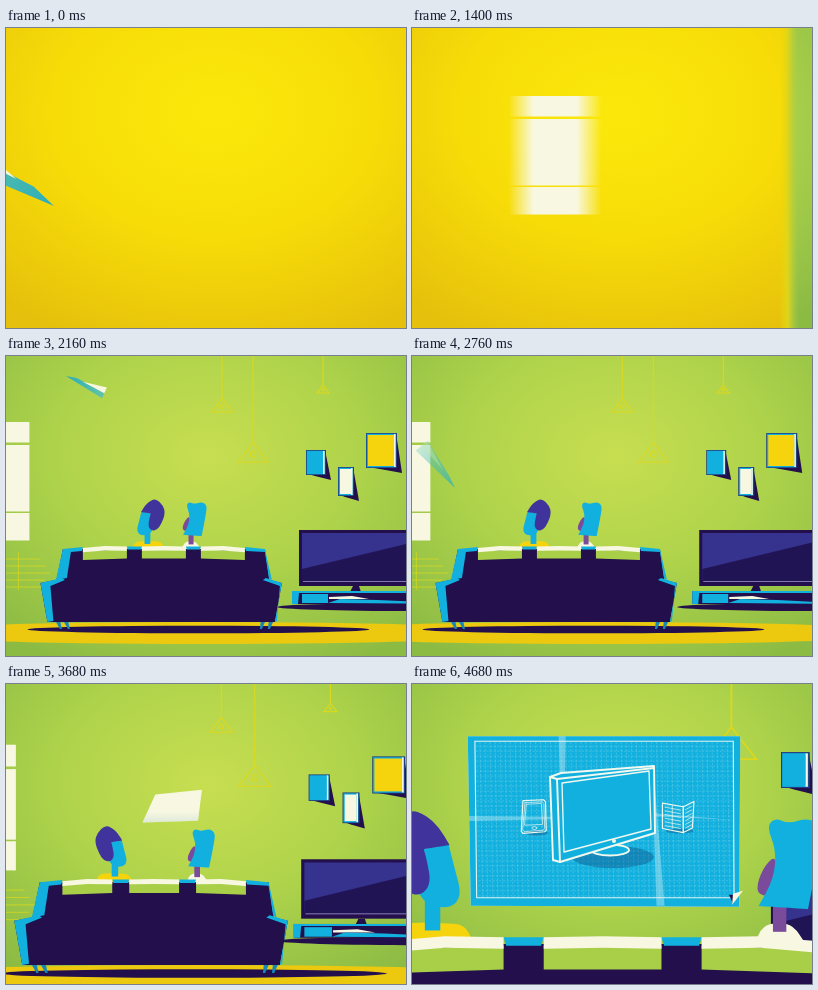
An HTML page with a canvas for the animation above (4760 ms loop, 400 by 300 pixels).

```html
<!DOCTYPE html>
<html lang="en">
<head>
<meta charset="utf-8">
<title>Paper plane</title>
<style>
html, body { margin: 0; width: 100%; height: 100%; overflow: hidden; background: #f6da08; }
canvas { display: block; width: 400px; height: 300px; }
</style>
</head>
<body>
<canvas id="stage" width="400" height="300"></canvas>
<script>
const g = document.getElementById('stage').getContext('2d');
const LOOP = 4760, STEP = 40;
const INK = '#230f4b', BLUE = '#12b0df', CREAM = '#f8f8e2', YELLOW = '#f5d30d',
  VIOLET = '#40349c', PLUM = '#7a4b9b', WIRE = '#ded81a';

// Motion rules
const mix = (a, b, u) => a + (b - a) * u;
const ramp = (t, a, b) => {
  const u = Math.min(1, Math.max(0, (t - a) / (b - a)));
  return u * u * (3 - 2 * u);
};
// Distance still to travel for a part that glides to rest.
const glideIn = (t, x, tau) => x * Math.exp((1400 - t) / tau);
const roomX = t => glideIn(t, 373, 184);
const windowX = t => glideIn(t, 159, 220);
const dolly = t => ramp(t, 3490, 4170) + 0.02 * ramp(t, 4100, 4800);
const bezier = (a, b, c, d, u) => {
  const v = 1 - u;
  return v * v * v * a + 3 * v * v * u * b + 3 * v * u * u * c + u * u * u * d;
};

// Drawing helpers
function trace(p) {
  g.beginPath();
  for (let i = 0; i < p.length; i += 2) g.lineTo(p[i], p[i + 1]);
}
function poly(color, ...p) {
  trace(p);
  g.closePath();
  g.fillStyle = color;
  g.fill();
}
function line(...p) { trace(p); g.stroke(); }
function loop(...p) { trace(p); g.closePath(); g.stroke(); }
function rect(color, x, y, w, h) { g.fillStyle = color; g.fillRect(x, y, w, h); }
function ring(x, y, rx, ry = rx) {
  g.beginPath();
  g.ellipse(x, y, rx, ry, 0, 0, 7);
  g.stroke();
}
function oval(color, x, y, rx, ry) {
  g.beginPath();
  g.ellipse(x, y, rx, ry, 0, 0, 7);
  g.fillStyle = color;
  g.fill();
}
// Smooth closed shape; a point given twice makes a sharp corner.
function blob(color, ...p) {
  const n = p.length, mid = i => [(p[i % n] + p[(i + 2) % n]) / 2, (p[(i + 1) % n] + p[(i + 3) % n]) / 2];
  g.beginPath();
  g.moveTo(...mid(n - 2));
  for (let i = 0; i < n; i += 2) g.quadraticCurveTo(p[i], p[i + 1], ...mid(i));
  g.fillStyle = color;
  g.fill();
}
function at(x, y, sx, sy, draw) {
  g.save();
  g.translate(x, y);
  g.scale(sx, sy);
  draw();
  g.restore();
}
function glow(x, y, r, stops) {
  const f = g.createRadialGradient(x, y, 0, x, y, r);
  stops.forEach((c, i) => f.addColorStop(i / (stops.length - 1), c));
  return f;
}
function fade(x0, x1, ...stops) {
  const f = g.createLinearGradient(x0, 0, x1, 0);
  stops.forEach(([u, c]) => f.addColorStop(u, c));
  return f;
}
const sunny = glow(160, 85, 250, ['#fbe90a', '#f7dc08', '#e5c00c']);
const leafy = glow(155, 100, 235, ['#c8de51', '#aed34b', '#8cbb44']);
const backdrop = fill => at(0, 0, 1.3, 1, () => rect(fill, 0, 0, 400, 300));

// One camera for all layers: nearer layers have more depth and grow faster.
function layer(t, depth, x, draw) {
  const z = 1 / (1 - depth * dolly(t));
  at(119 * (1 - z) + x - 2 * ramp(t, 2800, 3600), 153 * (1 - z), z, z, draw);
}

// Room
function panes(t) {
  const x = windowX(t) - 50, w = 68;
  const b = Math.min(30, (windowX(t - STEP) - windowX(t)) * 0.8), e = b / (w + b);
  const clear = 'rgba(248,248,226,0)';
  const fill = b < 2 ? CREAM : fade(x - b / 2, x + w + b / 2, [0, clear], [e, CREAM], [1 - e, CREAM], [1, clear]);
  const y = 2 * (1 - ramp(t, 1400, 1800));
  for (const [top, h] of [[66, 20.5], [89, 66.5], [157, 27.5]]) rect(fill, x - b / 2, top + y, w + b, h);
}
function picture(x, y, w, h, color) {
  poly(INK, x + 2, y + h - 1, x + w - 1, y, x + w + 5, y + h + 5, x + w * 0.45, y + h + 1);
  rect('#1f3f80', x, y, w, h);
  rect(BLUE, x + 0.8, y + 0.8, w - 2, h - 1.6);
  rect(CREAM, x + w - 3, y + 1, 1.6, h - 2);
  rect(color, x + 2, y + 2, w - 5, h - 4);
}
function shelf() {
  g.strokeStyle = WIRE;
  g.lineWidth = 0.7;
  for (let i = 0; i < 5; i++) line(-60, 203 + i * 7, 26 + (i * 5) % 11, 203 + i * 7);
  line(4, 196, 4, 234);
}
function wall() {
  picture(294, 94, 20, 25, BLUE);
  picture(326, 111, 16, 29, CREAM);
  picture(354, 77, 31, 35, YELLOW);
  oval(INK, 400, 251, 135, 4);
  rect(INK, 287, 174, 150, 56);
  rect('#36338f', 290, 177, 145, 47);
  poly('#211455', 290, 213, 435, 178, 435, 225, 290, 225);
  rect('#8b83bd', 291, 225, 144, 0.9);
  poly(INK, 341, 230, 347, 230, 349, 236, 338, 236);
  rect(INK, 280, 235, 170, 13);
  poly(BLUE, 280, 235, 450, 235, 450, 237, 287, 237, 286, 248, 280, 248);
  rect(BLUE, 290, 238, 26, 9);
  poly(CREAM, 317, 241, 340, 240, 357, 243, 317, 243);
  poly(BLUE, 328, 243, 365, 244, 450, 248, 316, 247);
}
function lamp(x, y, w) {
  const h = w * 1.28;
  line(x, -80, x, y - h);
  loop(x, y - h, x + w, y, x - w, y);
  ring(x, y - h * 0.4, w * 0.18);
}
function lamps() {
  g.strokeStyle = WIRE;
  g.lineWidth = 1.05;
  lamp(210, 56, 10.5);
  lamp(241, 106, 15);
  lamp(311, 37, 6);
}
function room(t) {
  const x = roomX(t), edge = glideIn(t, 376, 85);
  if (edge < 400) {
    g.save();
    g.beginPath();
    g.rect(edge, 0, 400, 300);
    g.clip();
    backdrop(leafy);
    g.restore();
  }
  if (edge > 4 && edge < 420) {
    rect(fade(edge - 9, edge + 11, [0, 'rgba(240,214,10,0)'], [0.45, '#dcd51c'], [1, 'rgba(170,205,70,0)']), edge - 9, 0, 20, 300);
  }
  layer(t, 0.39, x, lamps);
  layer(t, 0.3, x * 1.4, shelf);
  layer(t, 0.3, x, wall);
  layer(t, 0.3, 0, () => panes(t));
}

// Sofa and the two viewers
function sofa() {
  for (const s of [-1, 1]) {
    for (const x of [s * 99, s * 107]) poly('#1787b8', x - 2, 73, x + 3, 73, x + 2 - s * 3, 82, x - s * 3, 82);
  }
  poly(INK, -101, 2, 101, 2, 106, 36, 106, 75, -106, 75, -108, 36);
  for (const s of [-1, 1]) {
    const out = s < 0 ? 123.5 : 118, lit = s < 0 ? 10 : 2;
    poly(INK, s * 98, 31, s * out, 36, s * (out - 7), 75, s * 98, 75);
    poly(BLUE, s * 101, 2, s * 81, 0, s * 82, 4, s * (103 - lit), 5, s * (107 - lit), 31, s * 108, 33);
    poly(BLUE, s * out, 36, s * 102, 31, s * 99, 33, s * (out - lit), 39, s * (out - lit - 3), 74, s * (out - 7), 75);
    poly(BLUE, s * 37, -0.5, s * 22, -0.5, s * 23, 2.6, s * 36, 2.6);
  }
  for (const c of [-59, 0, 59]) {
    const a = c - 22, b = c + 22, l = c < 0 ? 1 : -0.5, r = c > 0 ? 1 : -0.5, m = -0.9;
    poly('#a9cf49', a, l + 3, b, r + 3, b, r + 12, a, l + 12);
    poly(CREAM, a, l, c, m, b, r, b, r + 4.3, c, m + 4.3, a, l + 4.3);
  }
}
function man() {
  blob(YELLOW, -40, 4, -40, 4, -34, -14, -8, -16, 12, -15, 34, -14, 42, 4, 42, 4);
  rect(BLUE, -5, -45, 15, 37);
  blob(BLUE, -7, -87, -7, -87, 18, -92, 18, -92, 24, -68, 31, -42, 20, -29, -4, -33, -14, -50);
  blob(VIOLET, -38, -108, -20, -126, -4, -120, 9, -108, 19, -91, 19, -91, -6, -87, -6, -87,
    -3, -76, 1, -54, -8, -42, -22, -44, -34, -60, -44, -88);
}
function woman() {
  blob(CREAM, -28, 4, -28, 4, -20, -14, -4, -17, 10, -14, 22, 4, 22, 4);
  rect(PLUM, -10, -40, 13, 32);
  blob(PLUM, -6, -84, -20, -70, -27, -48, -18, -42, -4, -46);
  blob(BLUE, -16, -110, -8, -119, 5, -113, 24, -119, 38, -110, 35, -85, 24, -30, 24, -30,
    -24, -33, -24, -33, -9, -60, -7, -88);
}
function viewers(t) {
  const apart = ramp(t, 3420, 4170), face = t < 3200 ? -1 : 1, s = 1 / 2.6;
  layer(t, 0.615, roomX(t) * 1.9, () => {
    oval('#ecc90f', 186, 277, 315, 11);
    oval(INK, 181, 273.5, 171, 3.8);
    at(131 - 9 * ramp(t, 2160, 2700) - 40 * apart, 191, s * face, s, man);
    at(175 + 39 * apart, 191.5, s, s, woman);
    at(146.5, 191, 1, 1, sofa);
  });
}

// Plane: nose follows a Bezier curve, size runs from s0 to s1
const swoop = { t0: 0, t1: 1120, s0: 110, s1: 50, x: [48, 480, 430, -90], y: [178, 430, -340, 210] };
const glides = [
  { t0: 1640, t1: 2160, s0: 52, s1: 42, x: [450, 330, 160, 60], y: [110, 80, 65, 20] },
  { t0: 2160, t1: 2760, s0: 42, s1: 54, x: [60, -60, -20, 43], y: [20, -34, 54, 132] },
  { t0: 2760, t1: 3400, s0: 54, s1: 30, x: [43, 110, 260, 165], y: [132, 215, 180, 118] }
];
function plane(path, t) {
  if (t < path.t0 || t >= path.t1) return;
  const u = (t - path.t0) / (path.t1 - path.t0), len = mix(path.s0, path.s1, u);
  const pos = v => [bezier(...path.x, v), bezier(...path.y, v)];
  const [x, y] = pos(u), [ax, ay] = pos(u - 0.002), [bx, by] = pos(u + 0.002);
  const haze = ramp(t, 2500, 2700) * (1 - ramp(t, 2850, 3050));
  g.save();
  g.globalAlpha = 1 - 0.25 * haze;
  g.translate(x, y);
  g.rotate(Math.atan2(by - ay, bx - ax));
  g.scale(len, bx < ax ? -len : len);
  const tail = haze > 0.5 ? 'rgba(90,200,185,.4)' : '#62c4a8';
  poly(fade(-1, 0, [0, tail], [1, '#2cadb8']), 0, 0, -0.25, -0.06, -1, -0.02 - 0.14 * haze, -1, 0.13);
  poly(haze > 0.5 ? 'rgba(200,232,190,.5)' : CREAM, -0.42, -0.04, -1, -0.15, -1, 0);
  g.restore();
}

// Gadgets, each drawn around its own centre
const shadow = (x, y, rx, ry) => oval('rgba(14,74,128,.4)', x, y, rx, ry);
function radio() {
  shadow(4, 30, 32, 7);
  loop(-31, -20, 30, -27, 31, 24, -29, 30);
  line(-31, -20, -24, -27, 20, -33, 30, -27);
  line(18, -30, 30, -64);
  ring(-14, 6, 10);
  ring(17, 4, 8);
  line(-22, -12, 22, -17);
}
function phone() {
  shadow(6, 39, 28, 6);
  loop(-27, -40, 24, -42, 28, -37, 30, 32, 26, 36, -27, 40, -31, 35);
  g.lineWidth *= 0.6;
  loop(-23, -35, 20, -37, 24, -33, 26, 28, 23, 32, -23, 36, -27, 32);
  loop(-20, -31, 18, -33, 21, 18, -22, 20);
  ring(1, 27, 6, 3.5);
}
function tv() {
  shadow(12, 43, 41, 11);
  oval(BLUE, 9, 36, 20, 6);
  ring(9, 36, 19, 5.5);
  poly(BLUE, -51, -37, -40, -41, 53, -48, 54, 19, -41, 48, -48, 46);
  g.stroke();
  line(-51, -37, -44, -35, 53, -46);
  line(-44, -35, -41, 48);
  g.lineWidth *= 0.7;
  loop(-39, -31, 48, -43, 50, 15, -37, 38);
  oval(CREAM, 13, 27, 2, 2);
}
function book() {
  shadow(4, 34, 34, 6);
  loop(-38, -34, 13, -25, 13, 38, -38, 28);
  loop(13, -25, 39, -38, 35, 27, 13, 38);
  g.lineWidth *= 0.6;
  for (let y = -24; y < 25; y += 9) {
    line(-32, y, 6, y + 7);
    line(18, y + 6, 33, y - 2);
  }
  line(-14, -28, -14, 28);
}
const slide = t => ramp(t, 4130, 4350) + ramp(t, 4440, 4660);
function gadgets(p, strength) {
  [radio, phone, tv, book].forEach((draw, i) => {
    const d = i - p, far = Math.min(1, Math.abs(d)), z = 1 - 0.59 * far;
    g.save();
    g.globalAlpha = strength * (1 - ramp(Math.abs(d), 1.05, 1.7));
    g.strokeStyle = '#f1f8ee';
    g.lineJoin = g.lineCap = 'round';
    g.lineWidth = 1.9 + far * 0.9;
    at(189 + d * (d < 0 ? 67 : 77), 130 + far * 3, z, z, draw);
    g.restore();
  });
}

// Paper that unfolds into the blueprint; corners clockwise from top left
const paper = [150, 111, 195, 106, 191, 136, 137, 138];
const print = [57, 53, 327, 53, 326, 222, 60, 221];
function blueprint() {
  g.lineWidth = 0.6;
  g.strokeStyle = 'rgba(205,240,240,.42)';
  g.setLineDash([2, 1.5]);
  for (let x = 12; x < 262; x += 5) line(x, 6, x, 162);
  for (let y = 10; y < 162; y += 5) line(8, y, 262, y);
  g.setLineDash([]);
  const crease = 'rgba(215,242,244,.4)';
  poly(crease, 90, 0, 97, 0, 93, 110, 91, 110);
  poly(crease, 0, 80, 90, 81, 180, 77, 262, 84, 180, 80, 90, 83, 0, 85);
  poly(crease, 182, 42, 184, 42, 192, 170, 184, 170);
  g.strokeStyle = '#e4f5ef';
  g.lineWidth = 1.1;
  loop(7, 5, 263, 5, 261, 162, 6, 162);
  poly(INK, 256, 159, 262, 159, 260, 168);
  poly(CREAM, 259, 169, 260, 158, 270, 155);
}
function sheet(t) {
  const open = ramp(t, 3340, 3620), grow = ramp(t, 3660, 4040), blue = ramp(t, 3720, 3860);
  if (!open) return;
  const z = open * mix(1, 1 + (dolly(t) - 1) / 2, grow);
  const cx = mix(167, 192, grow), cy = mix(122, 137, grow);
  const q = paper.map((v, i) => {
    const c = i % 2 ? cy : cx;
    return c + (mix(v, print[i], grow) - c) * z;
  });
  poly(CREAM, ...q);
  const shade = g.createLinearGradient(0, q[1], 0, q[7]);
  shade.addColorStop(0.6, 'rgba(190,215,205,0)');
  shade.addColorStop(1, 'rgba(190,215,205,.45)');
  poly(shade, ...q);
  g.save();
  g.globalAlpha = blue;
  poly(BLUE, ...q);
  g.transform((q[2] - q[0]) / 270, (q[3] - q[1]) / 270, (q[6] - q[0]) / 170, (q[7] - q[1]) / 170, q[0], q[1]);
  blueprint();
  g.restore();
  const p = slide(t), trail = slide(t - 14), shown = ramp(t, 3900, 4000);
  if (p - trail > 0.01) gadgets(trail, shown * 0.4);
  gadgets(p, shown);
}

function draw(t) {
  backdrop(sunny);
  plane(swoop, t);
  room(t);
  sheet(t);
  viewers(t);
  glides.forEach(path => plane(path, t));
}

const start = performance.now();
function tick() {
  const t = (performance.now() - start) % LOOP;
  draw(Math.min(4680, Math.floor(t / STEP) * STEP));
  requestAnimationFrame(tick);
}
tick();
</script>
</body>
</html>
```
